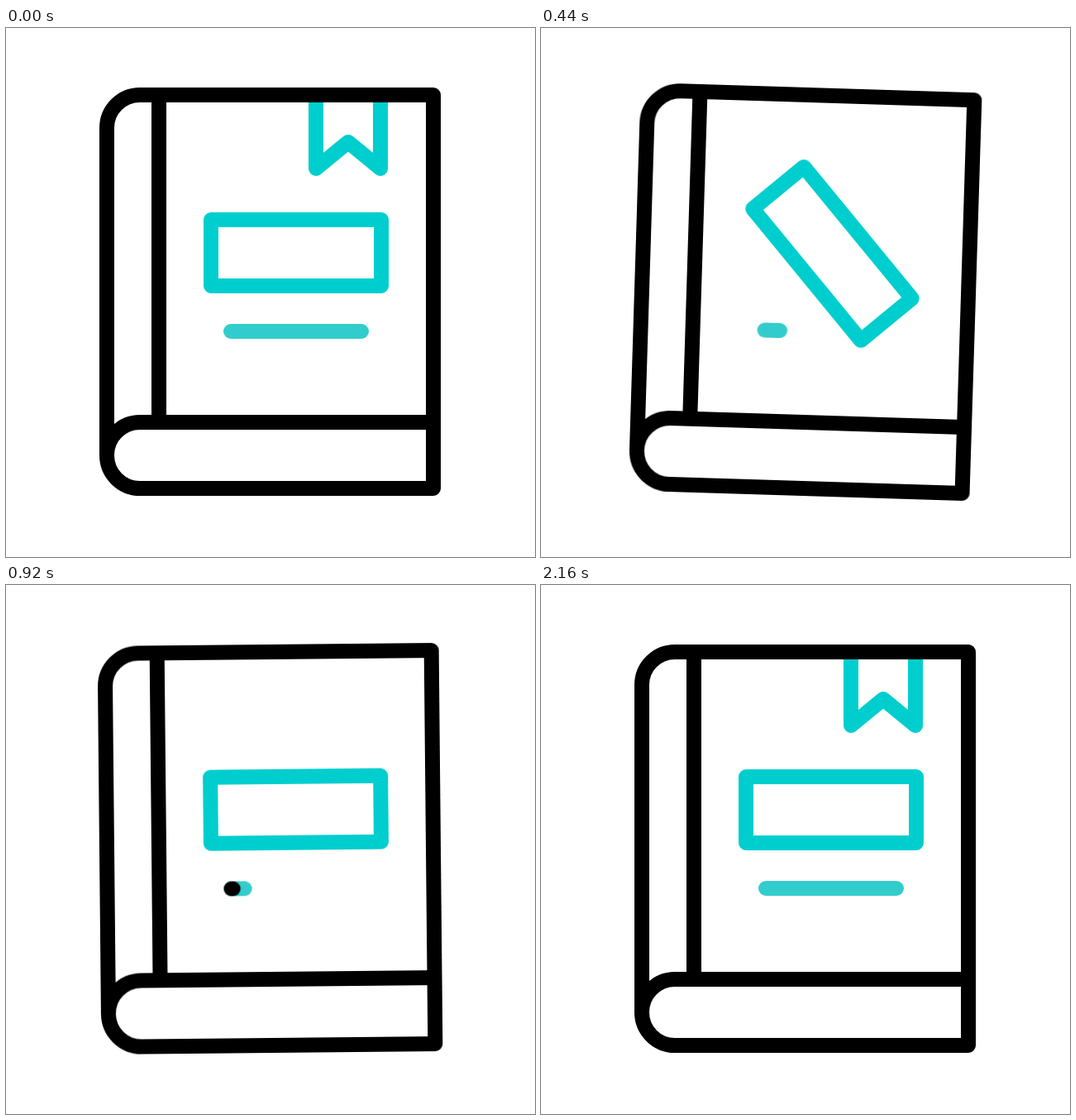
An HTML page for the animation above (2.84 s loop, 640x640 px).

```html
<!DOCTYPE html>
<html lang="en">
<head>
<meta charset="utf-8">
<title>Book</title>
<style>
  html, body { margin: 0; width: 100%; height: 100%; overflow: hidden; background: #fff; }
  svg { display: block; width: 100%; height: 100%; }
  path, rect { fill: none; stroke-width: 18; stroke-linecap: round; stroke-linejoin: round; }

  /* The clock in --t seeks every animation, in whole 40 ms steps. */
  .move {
    animation: 2840ms cubic-bezier(.333, 0, .667, 1) calc(var(--t, 0) * -1ms) infinite paused;
  }
  .ink { stroke: #000; }
  .teal { stroke: #00cece; }
  .rule { stroke-dasharray: 158 400; }
  .soft { stroke: #3cc; }

  #book { animation-name: wobble; transform-origin: 320px 320px; }
  #label { animation-name: turn; transform-origin: 351px 272px; }
  #ribbon { animation-name: slide; }
  #line { animation-name: redraw; }
  #sweep { animation-name: sweep; }

  @keyframes wobble {
    0% { transform: rotate(0deg); }
    8.7% { transform: rotate(-7deg); }
    17.39% { transform: rotate(3deg); }
    26.09% { transform: rotate(-3deg); }
    34.79%, 100% { transform: rotate(0deg); }
  }
  @keyframes turn {
    0%, 8.52% { transform: rotate(0deg); }
    19.12% { transform: rotate(-180deg); }
    28.52%, 100% { transform: rotate(0deg); }
  }
  @keyframes slide {
    0% { transform: translateY(0); }
    14.68%, 33.17% { transform: translateY(-102px); }
    47.85%, 100% { transform: translateY(0); }
  }
  @keyframes redraw {
    0%, 4.01% { stroke-dashoffset: 0; }
    18.63%, 29.23% { stroke-dashoffset: 158.2; }
    45.07%, 100% { stroke-dashoffset: 0; }
  }
  @keyframes sweep {
    0%, 30.99% { stroke-dashoffset: 158.2; }
    49.79%, 52.46% { stroke-dashoffset: 0; }
    75.7%, 100% { stroke-dashoffset: -158.2; }
  }
</style>
</head>
<body>
<svg viewBox="0 0 640 640">
  <clipPath id="cover"><path d="M185 85H517V477H185Z"/></clipPath>
  <g id="book" class="move">
    <g clip-path="url(#cover)">
      <path id="ribbon" class="move teal" d="M375 0V170L414 138L453 170V0"/>
    </g>
    <rect id="label" class="move teal" x="248" y="232" width="206" height="80"/>
    <path id="line" class="move rule soft" d="M272 367H430"/>
    <path id="sweep" class="move rule ink" d="M272 367H430"/>
    <path class="ink" d="M517 477H162A40 40 0 0 0 162 557H517V81H162A40 40 0 0 0 122 121V517M185 81V477"/>
  </g>
</svg>
<script>
  const LOOP = 2840, STEP = 40;
  const root = document.documentElement;

  function tick() {
    // A few ms of slack keeps display jitter from delaying a step.
    const step = Math.floor((performance.now() + 6) / STEP);
    root.style.setProperty('--t', (step * STEP) % LOOP);
    requestAnimationFrame(tick);
  }
  tick();
</script>
</body>
</html>
```
